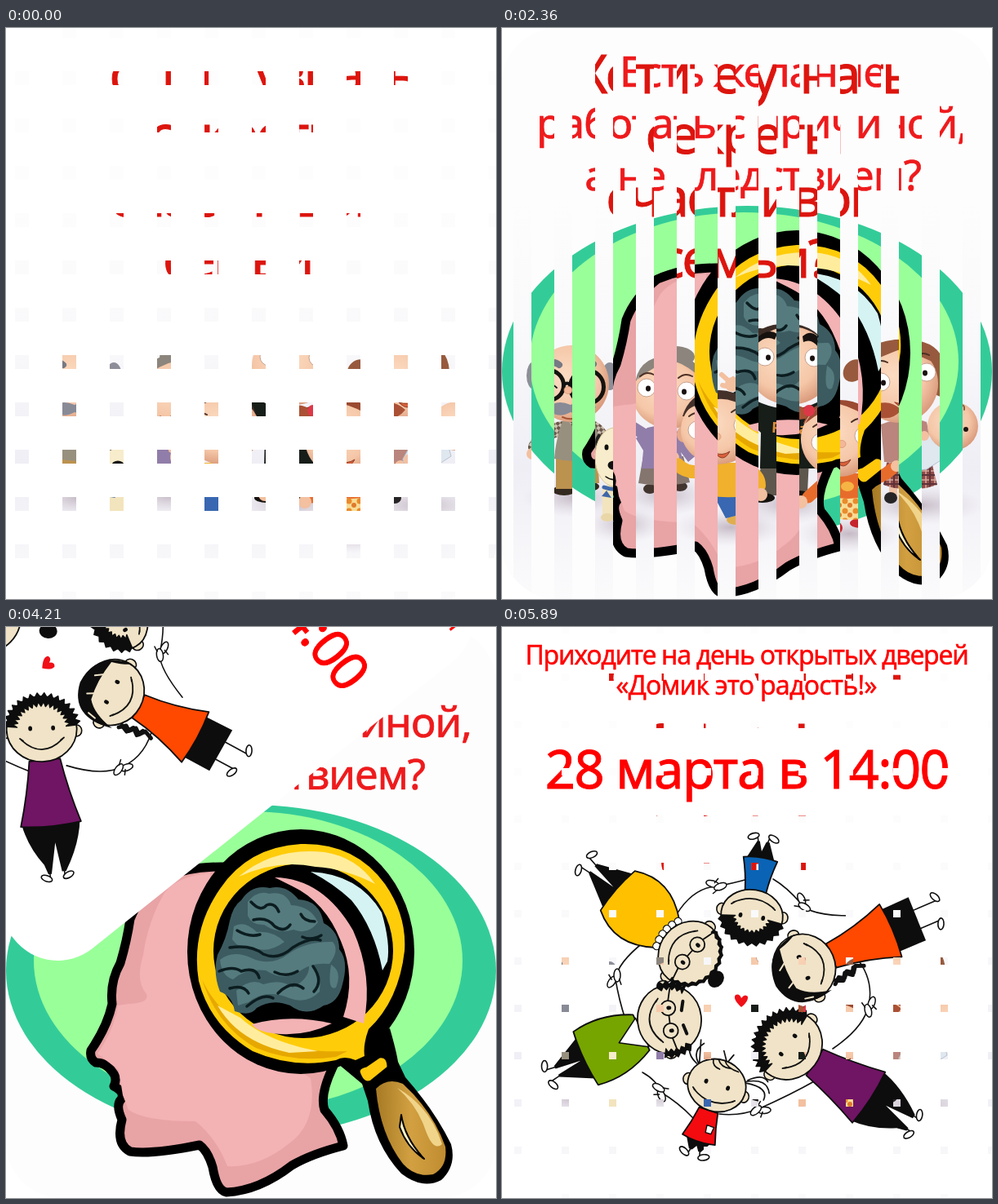
These frames come from a looping animation (600 px wide and 700 px high, 6060 ms). An HTML page:

```html
<!DOCTYPE html>
<html lang="ru">
<head>
<meta charset="utf-8">
<style>
html,body{margin:0;width:100%;height:100%;overflow:hidden;background:#fff}
svg{display:block;width:100vw;height:100vh}
text{font-family:"Noto Sans","Open Sans",sans-serif;text-anchor:middle}
</style>
</head>
<body>
<svg viewBox="0 0 600 700">
<defs>
<linearGradient id="floor" x1="0" y1="0" x2="0" y2="1">
<stop offset=".3" stop-color="#fdfdfd"/><stop offset=".55" stop-color="#f9f9fb"/><stop offset=".77" stop-color="#efeef5"/><stop offset=".88" stop-color="#f5f4f8"/><stop offset="1" stop-color="#fbfbfc"/>
</linearGradient>
<radialGradient id="skin" cx=".42" cy=".4" r=".62">
<stop offset="0" stop-color="#fcdcc2"/><stop offset=".65" stop-color="#f5c7a8"/><stop offset="1" stop-color="#d99a7b"/>
</radialGradient>
<radialGradient id="shade"><stop offset="0" stop-color="#b5a6b4" stop-opacity=".75"/><stop offset="1" stop-color="#d8d0dc" stop-opacity="0"/></radialGradient>
<linearGradient id="wood"><stop offset="0" stop-color="#a67a24"/><stop offset=".5" stop-color="#d2a041"/><stop offset="1" stop-color="#c08c30"/></linearGradient>
<pattern id="check" width="8" height="8" patternUnits="userSpaceOnUse" patternTransform="rotate(35)"><path d="M0 0h8v8h-8z" fill="#cbbfb0"/><path d="M0 0h4v4h-4zM4 4h4v4h-4z" fill="#6d574b"/></pattern>
<pattern id="plaid" width="11" height="11" patternUnits="userSpaceOnUse"><path d="M0 0h11v11h-11z" fill="#8f4c48"/><path d="M2 0v11M0 4h11" stroke="#d6a69a" stroke-width="1.5"/><path d="M7 0v11M0 9h11" stroke="#5d3138" stroke-width="2"/></pattern>
<pattern id="floral" width="13" height="12" patternUnits="userSpaceOnUse"><path d="M0 0h13v12h-13z" fill="#f8dc94"/><circle cx="4" cy="4" r="3.5" fill="#e98b2c"/><circle cx="10" cy="9" r="3" fill="#e07a2c"/></pattern>
<clipPath id="card"><rect width="600" height="700" rx="68"/></clipPath>
<clipPath id="mask"><path/></clipPath>
<g id="family" clip-path="url(#card)"></g>
<g id="mind" clip-path="url(#card)"></g>
<g id="ring"></g>
</defs>
<use id="back"/>
<g id="cut"><use id="front"/></g>
</svg>
<script>
const $ = s => document.querySelector(s);
const oval = (x, y, rx, ry, fill, more = '') => `<ellipse cx="${x}" cy="${y}" rx="${rx}" ry="${ry}" fill="${fill}" ${more}/>`;
const path = (d, fill, stroke = 'none', w = 0) =>
  `<path d="${d}" fill="${fill}" stroke="${stroke}" stroke-width="${w}" stroke-linejoin="round" stroke-linecap="round"/>`;
const line = (d, w = 1.6, c = '#111') => path(d, 'none', c, w);
const text = (s, x, y, size, fill, gap) =>
  `<text x="${x}" y="${y}" font-size="${size}" fill="${fill}" stroke="${fill}" stroke-width="${size * .014}" letter-spacing="${gap}em">${s}</text>`;
const SKIN = 'url(#skin)';

// Clay family
const shadow = (x, y, rx) => oval(x, y + 8, rx, 24, 'url(#shade)');
const eye = (x, y, dx = 2, r = 11) => oval(x, y, r, r, '#fff', 'stroke="#b98d78" stroke-width=".8"') + oval(x + dx, y + 1, 3, 3.4, '#1a1210');
const hand = (x, y, r = 7) => oval(x, y, r, r, '#f3c0a0');
const smile = (x, y, w = 10) => path(`M${x - w} ${y}Q${x} ${y + 4} ${x + w} ${y - 2}Q${x + 1} ${y + 13} ${x - w} ${y}`, '#d9603a', '#8c3d28', 1);
const nose = (x, y) => oval(x, y, 5, 4.5, '#f3b897', 'stroke="#d8977a" stroke-width=".8"');
const brow = (x, y) => line(`M${x - 8} ${y + 2}Q${x} ${y - 5} ${x + 9} ${y}`, 2, '#4b3025');

const papa =
  path('M319 528H376L374 570H346L344 545L336 573H310Z', '#5e574e') +
  oval(319, 576, 15, 6, '#15130f') + oval(363, 573, 15, 6, '#15130f') +
  path('M318 460Q355 475 388 458Q410 478 415 520L398 535L384 512V540H316L317 496Q294 476 283 447L295 440Q303 455 318 460Z', '#171d18') +
  hand(282, 437, 9) + line('M279 434L269 425M283 430L289 436M279 440L270 438', 6, '#f3c0a0') +
  oval(352, 494, 25, 14, '#171d18') + '<text x="352" y="497" font-size="18" font-weight="700" fill="#df8e38" transform="rotate(3 352 494)">PaPa</text>' +
  oval(404, 425, 9, 12, '#eeb596') +
  path('M305 392Q306 366 340 363Q386 358 403 400Z', '#3c2c25') + oval(316, 376, 10, 8, '#3c2c25') +
  oval(353, 414, 52, 48, SKIN) +
  path('M309 383Q325 366 337 375L334 382Q322 376 312 388ZM368 378Q382 366 393 388L387 391Q379 380 369 385Z', '#17120f') +
  eye(322, 403, 4) + eye(382, 404, -2) + nose(349, 414) + smile(351, 446, 12);

const mama =
  path('M474 558H484V578H474ZM499 558H510V578H499Z', '#f0c2a5') + oval(476, 576, 8, 7, '#262425') + oval(505, 577, 9, 7, '#262425') +
  path('M472 526L524 524L533 560Q500 572 467 560Z', 'url(#plaid)') +
  path('M464 486Q492 474 520 483L530 532H468Z', '#b9857c') +
  oval(431, 420, 12, 15, '#985a3e', 'transform="rotate(40 431 420)"') +
  path('M437 428Q433 387 481 382Q541 378 543 421Q550 438 538 452Q525 450 520 430Z', '#985a3e') +
  oval(486, 436, 48, 48, SKIN) +
  path('M441 414Q453 385 485 386Q514 388 529 410Q502 398 490 393Q468 401 441 414Z', '#985a3e') +
  brow(463, 410) + brow(514, 401) + eye(464, 434, 3) + eye(520, 422, -2) + nose(493, 431) + smile(492, 459, 11);

const granny =
  oval(181, 565, 8, 6, '#42352f') + oval(218, 562, 9, 6, '#42352f') +
  path('M173 525H222L230 557Q196 564 167 558Z', '#84766e') +
  path('M178 490Q207 482 226 493L240 522L228 532L219 520L224 540H171L173 518L164 503Z', '#917da9') +
  path('M184 486L205 505L221 487Z', '#e7dce4') + hand(209, 527, 8) + line('M177 500L158 488', 14, '#917da9') +
  oval(212, 403, 24, 13, '#8c857d') +
  path('M163 442Q162 404 207 400Q246 403 253 444Z', '#8c857d') + oval(163, 451, 8, 10, '#e8ad8f') +
  oval(206, 450, 46, 41, SKIN) +
  path('M166 431Q180 401 208 402Q238 405 248 433Q229 414 210 408Q188 412 166 431Z', '#8c857d') +
  brow(177, 425) + brow(224, 427) + eye(177, 441, 2) + eye(226, 445, -3) + nose(201, 449) + smile(197, 476, 8);

const grandpa =
  oval(76, 567, 14, 6, '#34291f') + oval(106, 562, 13, 6, '#34291f') +
  path('M66 520H117L119 558H95L91 537L87 565H66Z', '#bc924f') +
  line('M72 491Q48 496 41 514', 18, 'url(#check)') + line('M112 490Q124 497 122 510', 16, 'url(#check)') +
  path('M74 482H112Q121 500 116 529Q91 534 64 528Q66 503 74 482Z', '#97907f') +
  path('M80 480L92 496L105 480Z', 'url(#check)') + hand(37, 522, 7) +
  oval(39, 426, 9, 17, '#8d8e99') + oval(132, 427, 10, 17, '#8d8e99') +
  oval(85, 436, 46, 47, SKIN) +
  line('M56 414Q63 407 70 413M95 410Q104 405 112 412', 8, '#777984') +
  path('M55 467Q66 454 84 462Q104 451 115 465Q101 478 84 471Q68 480 55 467Z', '#888a96') + line('M74 477Q85 482 96 476', 2, '#a65436') +
  '<g fill="#f8d7c2" fill-opacity=".35" stroke="#15130f" stroke-width="5"><circle cx="57" cy="438" r="18.5"/><circle cx="104" cy="440" r="20.5"/></g>' +
  line('M75 438Q80 433 84 438', 4) + line('M50 441Q59 433 67 441M96 441Q105 433 113 441', 1.8) + nose(81, 444);

const dog =
  path('M123 563Q140 555 158 563Q161 580 153 599Q137 608 123 599Z', '#f2e4bd') + oval(129, 600, 8, 5, '#ead7a8') + oval(151, 597, 8, 5, '#ead7a8') +
  path('M119 497Q111 503 116 517L126 506ZM153 496Q165 499 162 514L151 503Z', '#222') +
  oval(138, 526, 24, 36, '#f7eccb', 'stroke="#d9c797" stroke-width="1"') +
  oval(128, 514, 2.5, 3.5, '#111') + oval(147, 513, 2.5, 3.5, '#111') + oval(137, 536, 7.5, 5.5, '#111') + line('M127 550Q138 558 149 549', 1.5) +
  line('M125 563Q141 569 157 561', 5, '#3f66a8') + path('M128 567L122 574L134 576Z', '#3f66a8');

const boy =
  oval(252, 606, 11, 7, '#dfae4e') + oval(286, 603, 11, 6, '#dfae4e') +
  path('M240 566H288L294 596L274 601L264 582L261 602L241 597Z', '#3967b1') +
  line('M244 544Q225 546 215 535', 16, '#f1b12c') + line('M298 541Q315 547 315 561', 16, '#f1b12c') +
  path('M241 533H300Q306 556 296 574Q264 578 238 569Z', '#f1b12c') +
  hand(208, 525, 7) + line('M206 522L201 518M209 521L209 516', 4, '#f3c0a0') + hand(317, 572, 8) +
  oval(222, 498, 8, 10, '#e6aa8a') +
  path('M221 476Q230 445 266 444Q303 445 308 484Z', '#44312a') + oval(265, 493, 46, 42, SKIN) +
  path('M226 469Q242 442 270 445Q297 448 304 468Q281 453 264 455Q243 457 226 469Z', '#44312a') +
  brow(237, 474) + brow(289, 469) + eye(239, 493, 3) + eye(295, 487, -3) + nose(263, 501) + smile(270, 521, 9);

const girl =
  path('M403 592H414V612H403ZM429 592H440V607H429Z', '#f1bd9d') + oval(408, 613, 9, 8, '#c6232c') + oval(439, 607, 13, 6, '#c6232c') +
  path('M399 569H449L457 599Q426 607 392 598Z', 'url(#floral)') +
  line('M396 556L375 575', 15, '#e76c2c') + line('M446 555Q465 552 477 541', 15, '#e76c2c') +
  path('M398 546H445L450 574Q424 580 396 574Z', '#e76c2c') + oval(423, 562, 8, 6, '#f5b443') +
  hand(366, 581, 8) + hand(483, 537, 7) +
  path('M378 470Q352 454 350 472Q352 485 379 477ZM451 465Q472 452 489 468Q476 485 452 474Z', '#aa5135') +
  path('M369 485Q377 457 413 456Q449 456 457 487Z', '#9b4a32') + oval(413, 504, 47, 46, SKIN) +
  path('M371 485Q387 455 415 457Q445 458 455 482Q433 466 413 461Q392 468 371 485Z', '#9b4a32') +
  oval(376, 469, 7, 7, '#dd3848') + oval(454, 469, 7, 7, '#dd3848') +
  brow(389, 487) + brow(436, 481) + eye(390, 508, 3) + eye(443, 500, -3) + nose(416, 510) + smile(418, 531, 9);

const baby =
  path('M500 503Q520 492 540 506L545 525L520 541L491 544L486 529Z', '#dfe7ef', '#b7c2d0', 1) + hand(517, 500, 6) + hand(495, 530, 8) +
  oval(552, 488, 31, 30, SKIN) + line('M559 463Q567 460 566 468', 2, '#985a3e') +
  oval(545, 482, 3, 3, '#20140f') + oval(568, 492, 3, 3, '#20140f') + nose(555, 491) + line('M542 500Q548 507 557 505', 2, '#b9502f');

$('#family').innerHTML =
  '<rect width="600" height="700" fill="url(#floor)"/>' +
  [[90, 568, 65], [150, 600, 50], [200, 565, 60], [280, 604, 70], [350, 576, 70], [425, 612, 65], [510, 577, 80]].map(s => shadow(...s)).join('') +
  papa + mama + granny + grandpa + dog + boy + girl + baby +
  [['Хотите узнать', 296, 80], ['секреты', 296, 154], ['счастливой', 296, 231], ['семьи?', 296, 306]]
    .map(([s, x, y]) => text(s, x, y, 65, '#dc150e', -.043)).join('');

// Head under a magnifier
const skull = 'M300 294H262Q222 294 190 308Q163 330 152 358Q148 385 140 412Q127 435 130 462Q124 490 104 519Q102 529 110 534Q122 534 130 545Q137 553 132 563Q146 570 141 579Q134 586 142 604Q134 634 152 643Q178 647 237 635Q247 642 253 662Q258 691 270 693Q310 691 350 660Q374 646 413 636Q409 614 390 592Q384 574 400 540L430 470Z';
$('#mind').innerHTML =
  '<rect width="600" height="700" fill="#fdfdfd"/>' +
  oval(300, 421, 300, 203, '#33cc99') + oval(296.5, 409, 262.5, 183, '#99ff99') +
  path(skull, '#e8a3a5', '#000', 11) +
  path('M250 301Q209 306 194 326Q174 360 168 402Q158 434 172 450Q176 461 150 462L137 464Q132 495 112 523L138 543L143 574L150 592Q170 606 232 606Q258 627 271 661Q310 663 347 633Q382 607 373 553L260 480Z', '#f3b2b4') +
  path('M400 530L438 508L470 492Q478 520 480 533L489 552Q525 593 545 634Q552 660 533 678Q510 690 484 670Q451 635 443 581L436 560Z', '#000') +
  oval(361, 398, 139, 150, '#000') +
  path('M361 266Q427 264 464 315Q491 354 488 397Q481 458 444 493Q437 512 439 526L428 531Q414 525 404 531Q352 542 302 520Q250 489 236 434Q226 373 262 321Q296 270 361 266Z', '#ffcc0a') +
  path('M240 432Q258 489 306 516Q352 535 404 527L418 520Q354 523 308 501Q259 474 240 432Z', '#e6a800') +
  oval(364, 397, 110, 107, '#000') +
  path('M329 307Q388 308 425 372Q450 428 438 486L413 478Q429 429 410 385Q391 337 351 318Z', '#f3b2b4') +
  path('M301 487Q347 474 399 486Q369 501 336 499Q307 497 301 487Z', '#f3b2b4') +
  path('M373 300Q432 303 460 350Q471 388 467 410L461 421Q451 369 423 335Q402 315 373 300Z', '#d5f3f2') +
  path('M285 306Q329 269 390 276Q429 282 452 315Q415 296 379 294Q333 284 285 306Z', '#ffed9d') +
  path('M259 464Q285 509 347 522L382 520Q319 508 287 479Z', '#ffed9d') +
  path('M288 335Q301 315 323 320Q343 315 358 334Q384 335 389 363Q408 373 408 395Q420 409 412 438Q407 461 389 464Q368 479 348 464Q326 455 307 467Q299 478 280 471Q277 452 262 447Q253 424 259 402Q270 382 274 360Q278 342 288 335Z', '#3c5b60') +
  path('M296 337Q308 322 322 327Q343 323 349 341Q373 342 382 362Q370 378 352 371Q334 377 316 365Q301 366 296 354ZM279 367Q292 359 307 374Q327 372 341 386Q321 401 302 393Q286 396 277 383ZM262 408Q278 395 301 406Q325 417 347 400Q368 385 400 386Q409 396 396 413Q374 411 361 421Q342 436 318 421Q293 418 278 432Q264 428 262 408ZM282 446Q300 429 315 438Q338 431 351 442Q372 431 371 415Q387 415 384 447Q368 463 347 455Q318 443 297 460L284 464ZM398 414Q412 422 404 442Q393 447 398 414Z', '#557b7e') +
  line('M300 337Q312 350 319 341Q329 337 334 349M303 359Q320 355 329 367Q341 375 348 365M283 372Q298 381 311 377M361 352Q365 361 378 361M274 393Q300 389 315 401Q334 409 351 393Q372 380 385 384M363 380Q374 385 386 378M261 422Q278 415 288 422Q306 416 310 430M274 443Q291 438 297 449M329 423Q343 430 357 422M333 449Q350 432 364 443M376 416Q389 434 377 447M295 465Q315 448 327 455', 3.5, '#0c1d20') +
  path('M433 548Q429 541 441 538L457 527Q468 525 468 540L447 557Q438 561 433 548Z', '#ffc80a', '#000', 3) +
  path('M453 566Q467 552 486 560Q523 594 538 637Q541 662 523 671Q501 675 486 658Q458 622 453 566Z', 'url(#wood)') +
  path('M479 565Q520 589 534 634Q523 644 513 615Q503 586 479 565Z', '#f0d48a') +
  path('M484 598Q488 626 512 652Q491 638 482 613Z', '#fff4c6', '#000', 2) +
  [['Есть желание', 307, 72], ['работать с причиной,', 306, 135], ['а не следствием?', 307, 199]]
    .map(([s, x, y]) => text(s, x, y, 51, '#ee1a1c', -.021)).join('');

// Ring of friends: each stands at the origin, feet along +y
const INK = '#0d0d0d';
const polar = (deg, rx, ry) => `${(Math.cos(deg * Math.PI / 180) * rx).toFixed(1)} ${(Math.sin(deg * Math.PI / 180) * ry).toFixed(1)}`;
// Shaggy band of hair between two ragged arcs
function shag(from, to, rx, ry, inner, rough, n) {
  const arc = (k, back) => Array.from({length: n + 1}, (_, i) => {
    const r = k + (i % 2 ? rough : 0);
    return polar(from + (to - from) * (back ? n - i : i) / n, rx * r, ry * r);
  });
  return path('M' + [...arc(1), ...arc(inner, true)].join('L') + 'Z', INK, INK, 1.5);
}
const foot = (x, y, s) => oval(x + 5 * s, y, 7, 3.6, '#fff', `stroke="${INK}" stroke-width="1.6" transform="rotate(${-25 * s} ${x} ${y})"`);
const legs = (top, knee, end, w) =>
  path(`M${-w} ${top}H${w}L7 ${knee}H4L0 ${top + 12}L-4 ${knee}H-8Z`, INK) + line(`M6 ${knee}L8 ${end}M-6 ${knee}L-8 ${end}`) + foot(8, end, 1) + foot(-8, end, -1);
const shirt = (top, end, a, b, bulge, fill) =>
  path(`M${-a} ${top}Q${-bulge} ${(top + end) / 2} ${-b} ${end}Q0 ${end + 5} ${b} ${end}Q${bulge} ${(top + end) / 2} ${a} ${top}Z`, fill, INK, 1.8);
const face = (rx, ry, glasses) =>
  [-1, 1].map(s => oval(s * rx, 3, 6, 7, '#f0e3c7', `stroke="${INK}" stroke-width="1.6"`)).join('') +
  oval(0, 0, rx, ry, '#f0e3c7', `stroke="${INK}" stroke-width="1.8"`) +
  oval(-14, -1, 2.4, 3, INK) + oval(14, -1, 2.4, 3, INK) + line(`M-25 13Q0 ${ry - 3} 25 13M-27 11L-23 14M27 11L23 14`, 1.8) +
  (glasses ? `<g fill="none" stroke="${INK}" stroke-width="1.8"><circle cx="-14" r="9"/><circle cx="14" r="9"/><path d="M-5 0H5M-23 -1L-38 -5M23 -1L38 -5"/></g>` : '');
const tilt = (deg, parts) => `<g transform="rotate(${deg})">${parts}</g>`;
const stand = (x, y, turn, parts) => `<g transform="translate(${x} ${y})">${tilt(turn, parts)}</g>`;

const arms = line('M214 352Q234 320 262 318Q284 314 301 309M332 309Q349 319 366 339Q376 354 428 354M433 404Q456 432 449 464Q443 491 405 517M384 556Q354 573 316 590Q292 600 266 597M234 602Q216 583 194 570Q190 556 172 546M174 386Q141 412 139 432Q143 456 151 481');
const grips = [[262, 318, 0], [367, 339, 50], [449, 465, 95], [316, 591, 160], [195, 569, 230], [139, 432, 290]].map(([x, y, a]) =>
  `<g transform="translate(${x} ${y}) rotate(${a})" fill="#fff" stroke="${INK}" stroke-width="1.5"><ellipse cx="-5" cy="-2" rx="8" ry="4" transform="rotate(15)"/><ellipse cx="5" cy="2" rx="8" ry="4" transform="rotate(-20)"/><path d="M-2 -4L3 -10M2 4L-4 9"/></g>`).join('');

const lad = legs(68, 92, 99, 18) + shirt(30, 70, 13, 21, 15, '#0a63b4') + face(38, 32) + shag(188, 352, 37, 33, .55, .12, 22);
const nana = legs(112, 158, 172, 30) + shirt(36, 117, 22, 32, 55, '#ffc000') +
  [-20, -12, -4, 4, 12, 20].map(x => oval(x, 41 - x * x / 90, 4.5, 4.5, '#fff', 'stroke="#111" stroke-width="1.2"')).join('') +
  oval(3, -45, 11, 9, INK) + face(41, 37, true) + shag(185, 355, 40, 37, .92, .06, 24);
const lady = line('M-12 148V176M12 148V182') + foot(-12, 177, -1) + foot(12, 183, 1) +
  path('M-28 110L28 110L29 151L-28 150Z', INK) + shirt(36, 115, 16, 35, 20, '#ff4800') + face(41, 38) +
  path('M-39 20Q-52 -32 -8 -41Q36 -41 42 5Q36 -4 32 -19Q4 -24 -20 -19Q-34 -8 -39 20Z', INK) + line('M-16 -27L-11 -18M8 -29L15 -19M-38 -4L-36 -14', 2, '#f0e3c7') +
  line('M-34 27L-28 34L-32 40L-25 46L-30 53L-23 58L-27 68M-30 29L-34 38L-26 43L-32 51L-24 55', 5);
const man = path('M-36 113Q-31 142 -13 166L-9 178H-5L3 140L8 176H13Q33 143 36 113Z', INK) + line('M-7 176V184M11 175V182') + foot(-7, 185, -1) + foot(11, 183, 1) +
  shirt(38, 117, 19, 37, 25, '#701464') + tilt(4, face(43, 40) + shag(186, 354, 42, 39, .72, .14, 32));
const lass = legs(66, 84, 91, 18) + shirt(32, 70, 12, 21, 15, '#f30b10') + path('M4 50H13L12 59H5Z', '#fff', INK, 1.4) +
  line('M-30 -19Q-42 -31 -31 -44M-32 -18Q-48 -25 -47 -41M-29 -20L-36 -47M33 -16Q56 -28 64 -11M33 -14Q62 -18 60 -1M34 -18Q49 -32 58 -24', 1.7) +
  face(36, 32) + line('M-8 -31Q-2 -22 10 -25M0 -32Q5 -24 20 -24M-14 -29Q-13 -21 -3 -20M2 -32L-5 -43M4 -32L8 -42', 1.7);
const gramps = legs(108, 152, 165, 30) + shirt(38, 113, 24, 36, 43, '#76a500') + path('M-19 37L0 68L20 37Z', '#fff', INK, 1.6) +
  tilt(18, face(42, 39, true) + shag(165, 215, 43, 39, .85, .1, 9) + shag(-35, 15, 43, 39, .85, .1, 9) + line('M-20 -19L-9 -16M9 -16L20 -19', 4));

$('#ring').innerHTML = '<rect width="600" height="700" rx="68" fill="#fff"/>' + arms +
  stand(306, 354, 188.6, lad) + stand(230, 400, 131, nana) + stand(370, 417, 247, lady) +
  stand(351, 513, 303, man) + stand(263, 562, 18.4, lass) + stand(205, 481, 65, gramps) + grips +
  path('M293 466Q282 456 286 451Q291 449 293 455Q297 449 301 453Q302 459 293 466Z', '#f01018') +
  text('Приходите на день открытых дверей', 299.5, 46, 32, '#f00', -.041) +
  text('«Домик это радость!»', 299, 83, 32, '#f00', -.025) +
  text('28 марта в 14:00', 300, 198, 65, '#f00', -.025);

// Transitions run in seven steps
const STEP = 170, PARTS = 7, LOOP = 6060;
const box = (x0, y0, x1, y1) => `M${x0} ${y0}H${x1}V${y1}H${x0}Z`;

function tiles(n) {
  const half = 29 * n / PARTS, r = Math.round;
  let d = '';
  for (let x = 19.5; x < 640; x += 58)
    for (let y = 3.5; y < 740; y += 58) d += box(r(x - half), r(y - half), r(x + half), r(y + half));
  return d;
}

function blinds(n) {
  const half = Math.round(25 * n / PARTS);
  let d = '';
  for (let x = 0; x <= 600; x += 50) d += box(x - half, 0, x + half, 700);
  return d;
}

function show(back, front, clip = '', angle = 0) {
  $('#back').setAttribute('href', back);
  $('#front').setAttribute('href', front);
  $('#front').setAttribute('transform', `rotate(${angle} 600 0)`);
  $('#mask path').setAttribute('d', clip);
  if (clip) $('#cut').setAttribute('clip-path', 'url(#mask)');
  else $('#cut').removeAttribute('clip-path');
}

const count = (t, from) => Math.floor((t - from) / STEP) + 1;
function draw(t) {
  if (t < 850) show('', '#family', tiles(count(t, 0) + 1));
  else if (t < 1850) show('', '#family');
  else if (t < 2870) show('#family', '#mind', blinds(count(t, 1850)));
  else if (t < 3870) show('', '#mind');
  else if (t < 4890) show('#mind', '#ring', '', 90 * (1 - count(t, 3870) / PARTS));
  else if (t < 5890) show('', '#ring');
  else show('#ring', '#family', tiles(1));
}

const start = performance.now();
let last = -1;
function tick() {
  const t = (performance.now() - start) % LOOP, slot = Math.floor(t / 10);
  if (slot !== last) draw(t);
  last = slot;
  requestAnimationFrame(tick);
}
tick();
</script>
</body>
</html>
```
